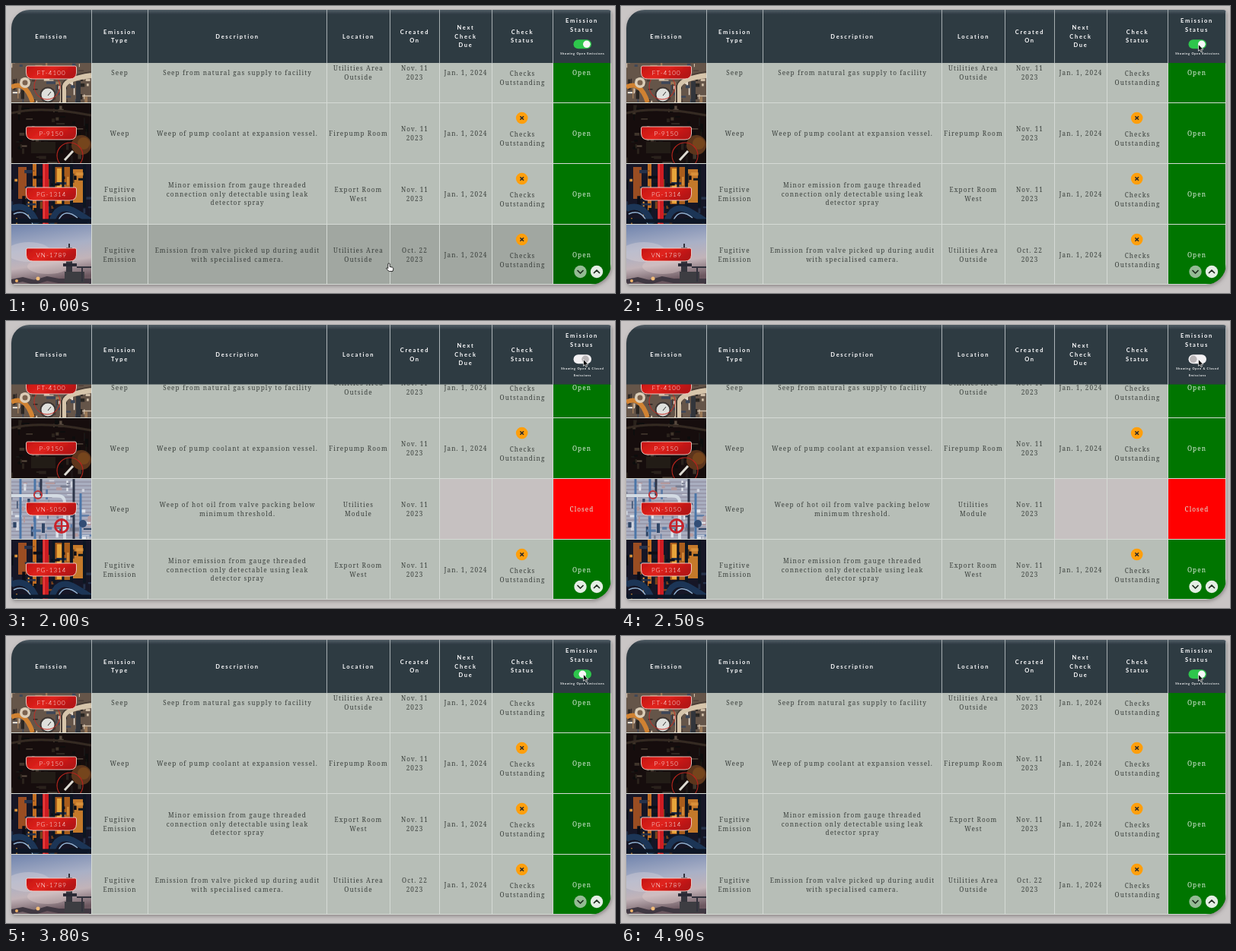
An HTML page that plays this animation: 800x378 px, repeating every 5 s.

```html
<!DOCTYPE html>
<html lang="en">
<head>
<meta charset="utf-8">
<title>Emission register</title>
<style>
  html, body { margin: 0; width: 100%; height: 100%; overflow: hidden; background: #c9c5c5; }
  svg { display: block; width: 100%; height: 100%; }
  text { text-anchor: middle; }
  .cell { font: 300 8.2px "Noto Serif", serif; letter-spacing: 1.08px; fill: #3b403d; }
  .status { fill: #dcebdc; }
  .head { font: bold 7.5px Lato, sans-serif; letter-spacing: 1.7px; fill: #fff; }
  .hint { font: bold 3.9px Lato, sans-serif; letter-spacing: .68px; fill: #fff; }
  .tag { font: 300 8px Lato, sans-serif; letter-spacing: 1.1px; fill: #fff; }
</style>
</head>
<body>
<svg viewBox="0 0 800 378">
  <defs>
    <clipPath id="frame"><path d="M7 29A24 24 0 0 1 31 5H791Q795 5 795 9V340A27 27 0 0 1 768 367H12Q7 367 7 362Z"/></clipPath>
    <clipPath id="photo"><rect width="105" height="80"/></clipPath>
    <linearGradient id="headFill" x2="0" y2="1">
      <stop stop-color="#56626a"/><stop offset=".09" stop-color="#2e3a43"/><stop offset="1" stop-color="#2e3a42"/>
    </linearGradient>
    <linearGradient id="tagFill" x2="1" y2=".4">
      <stop stop-color="#c41414"/><stop offset=".5" stop-color="#e0231c"/><stop offset="1" stop-color="#b51212"/>
    </linearGradient>
    <linearGradient id="sky" x2=".2" y2="1">
      <stop stop-color="#6f83ad"/><stop offset=".45" stop-color="#a9b0c6"/>
      <stop offset=".72" stop-color="#c2b3b8"/><stop offset="1" stop-color="#6c5860"/>
    </linearGradient>
    <filter id="shadow" x="-5%" y="-5%" width="110%" height="112%">
      <feDropShadow dx="1" dy="2" stdDeviation="2.5" flood-color="#504a4a" flood-opacity=".5"/>
    </filter>
  </defs>
  <g filter="url(#shadow)">
    <g clip-path="url(#frame)">
      <g id="openRows"></g>
      <g id="allRows"></g>
      <g id="header"></g>
    </g>
  </g>
  <g id="toggle">
    <rect id="track" x="745.5" y="44.3" width="23.5" height="12" rx="6"/>
    <circle id="knob" cy="50.3" r="4.8"/>
  </g>
  <g id="hintOpen" class="hint"><text x="757.3" y="64.3">Showing Open Emissions</text></g>
  <g id="hintAll" class="hint">
    <text x="757.3" y="64.3">Showing Open &amp; Closed</text><text x="757.3" y="72.7">Emissions</text>
  </g>
  <g fill="none" stroke="#1d2a1d" stroke-width="1.7" stroke-linecap="round" stroke-linejoin="round">
    <circle id="down" cx="754.5" cy="350" r="8.2" stroke="none"/>
    <path d="M751 348.5l3.5 3.5 3.5-3.5"/>
    <circle cx="776" cy="350" r="8.2" fill="#e4eee4" stroke="none"/>
    <path d="M772.5 351.5l3.5-3.5 3.5 3.5"/>
  </g>
  <path id="hand" fill="#fff" stroke="#111" stroke-width=".9" stroke-linejoin="round"
    d="M-1.2 .5Q0 -.8 1.2 .5V4.4L4.6 5.2Q6 5.8 5.8 7.6L5 10.4H.2L-3.6 6.8Q-3.4 5 -1.2 6.6Z"/>
  <path id="arrow" fill="#111" stroke="#fff" stroke-width=".7" d="M0 0V8.8L2 7.1 3.5 10.2 5 9.5 3.6 6.6H6.3Z"/>
</svg>
<script>
const $ = id => document.getElementById(id);
const COLUMNS = [7, 112.5, 186.5, 421.5, 504.5, 569.5, 638.5, 718.5, 794.5];
const ROW_TOP = 47, ROW_HEIGHT = 80, LOOP = 5000, STEP = 100;

const middle = column => (COLUMNS[column] + COLUMNS[column + 1]) / 2;
const rect = (x, y, w, h, fill) => `<rect x="${x}" y="${y}" width="${w}" height="${h}" fill="${fill}"/>`;
const disc = (x, y, r, fill) => `<circle cx="${x}" cy="${y}" r="${r}" fill="${fill}"/>`;
const pipe = (d, colour, width) => `<path d="${d}" fill="none" stroke="${colour}" stroke-width="${width}"/>`;
const ring = (x, y, r, colour, width = 1.5) =>
  `<circle cx="${x}" cy="${y}" r="${r}" fill="none" stroke="${colour}" stroke-width="${width}"/>`;

// Centred lines of text around y, separated by "|".
function lines(string, column, y, pitch, style) {
  const parts = string.split('|');
  return parts.map((part, i) =>
    `<text class="${style}" x="${middle(column)}" y="${y + 2.8 + (i - (parts.length - 1) / 2) * pitch}">${part}</text>`).join('');
}

// Short pipe-like strokes that give a photo its machinery texture.
function clutter(count, colours, seed, top = 0) {
  const random = () => (seed = seed * 16807 % 2147483647) / 2147483647;
  let out = '';
  for (let i = 0; i < count; i++) {
    const x = random() * 105, y = top + random() * (80 - top), length = 3 + random() * 11;
    const turn = random() < .5 ? `h${length}` : `v${length}`;
    out += pipe(`M${x.toFixed(1)} ${y.toFixed(1)}${turn}`, colours[i % colours.length], (1 + random() * 3.5).toFixed(1));
  }
  return out;
}

const PHOTOS = {
  valves: rect(0, 0, 105, 80, '#65554a')
    + clutter(75, ['#cfbda6', '#2b2524', '#9c7a58', '#e8dccd', '#3c4658', '#4c3c34'], 77, 20)
    + pipe('M0 60Q18 50 28 80', '#d08233', 6) + pipe('M68 80V60Q70 48 105 44', '#d6c5ab', 8)
    + pipe('M66 80V58Q68 45 105 40', '#4a3d35', 2)
    + pipe('M88 80V52', '#33343a', 6) + disc(18, 54, 7, '#dccdb7') + disc(18, 54, 3.5, '#7b6450')
    + disc(48, 70, 10.5, '#3b3431') + disc(48, 70, 8.5, '#dfe0dc') + pipe('M48 71l4-5', '#333', 1)
    + ring(47, 59, 17, '#c62a22', 1),
  pump: rect(0, 0, 105, 80, '#17110f')
    + clutter(60, ['#2c221d', '#0b0909', '#40342c', '#1d1816', '#5a4b40', '#0f0c0b'], 311)
    + disc(92, 56, 13, '#5d361b') + disc(95, 54, 8, '#75441f')
    + pipe('M0 14Q40 4 105 17', '#352a24', 3) + rect(26, 52, 32, 15, '#241d19')
    + pipe('M70 76l11-12', '#dedbd3', 3) + ring(77, 70, 17, '#b5221c', 1.2),
  gauge: rect(0, 0, 105, 80, '#131826')
    + rect(57, 5, 20, 49, '#a95d1c') + rect(60, 7, 6, 46, '#e8a43a') + rect(81, 8, 13, 44, '#c4792a')
    + rect(9, 5, 11, 42, '#9a4d20') + rect(28, 0, 5, 62, '#c26e23')
    + clutter(45, ['#25324c', '#0b0f18', '#7a421d', '#10141f', '#d9913a'], 58)
    + [56, 68, 79, 96].map(x => pipe(`M${x} 0V58`, '#0f1420', 3)).join('')
    + pipe('M45 0V80', '#cc1c20', 8) + pipe('M43 0V80', '#ec4944', 1.5)
    + pipe('M0 60Q22 50 34 80M52 80Q60 50 84 64T105 78', '#1c3657', 8)
    + pipe('M3 67Q20 59 28 80M62 75Q70 58 87 72', '#91afd0', 1.5) + pipe('M0 76H105', '#0b1627', 5),
  tower: rect(0, 0, 105, 80, 'url(#sky)')
    + `<g opacity=".4"><ellipse cx="23" cy="37" rx="29" ry="13" fill="#d9d3da"/><ellipse cx="48" cy="56" rx="27" ry="10" fill="#e1cdcc"/></g>`
    + pipe('M0 80V76L15 73 30 77 47 72 62 75H105V80', '#403842', 6)
    + disc(35, 72, 2.5, '#f1bc79') + disc(7, 75, 2, '#edb269')
    + rect(72, 31, 8, 45, '#35343c') + rect(68, 52, 18, 4, '#292c34') + rect(70, 63, 26, 15, '#3e3c43')
    + pipe('M76 26V34M68 34H84M86 57H105M93 57V76', '#30333c', 2),
  wall: rect(0, 0, 105, 80, '#a9aec0')
    + Array.from({ length: 16 }, (_, i) => pipe(`M0 ${i * 5}H105`, '#8a8698', 1)).join('')
    + clutter(70, ['#cfd3dd', '#5d7ba6', '#7a7f92', '#b49a9e', '#2f4566', '#dfe3ea'], 924)
    + pipe('M12 0V80M31 0V31M31 52V80M91 20V80', '#4c76a8', 3)
    + pipe('M0 23H60Q70 23 70 32V80', '#d3dbe3', 4) + pipe('M39 0V23M82 0V80', '#2d3648', 3)
    + ring(66, 63, 8.5, '#c8242b', 3) + pipe('M58 63H74M66 55V71', '#c8242b', 2)
    + ring(35, 22, 5, '#bd3439', 2) + disc(94, 60, 5, '#304d74')
};

const record = (photo, tag, type, description, place, created, closed) =>
  ({ photo, tag, type, description, place, created, closed });
const seep = record('valves', 'FT-4100', 'Seep', 'Seep from natural gas supply to facility', 'Utilities Area|Outside', 'Nov. 11|2023');
const weep = record('pump', 'P-9150', 'Weep', 'Weep of pump coolant at expansion vessel.', 'Firepump Room', 'Nov. 11|2023');
const oil = record('wall', 'VN-5050', 'Weep', 'Weep of hot oil from valve packing below|minimum threshold.', 'Utilities|Module', 'Nov. 11|2023', true);
const thread = record('gauge', 'PG-1314', 'Fugitive|Emission', 'Minor emission from gauge threaded|connection only detectable using leak|detector spray', 'Export Room|West', 'Nov. 11|2023');
const audit = record('tower', 'VN-1789', 'Fugitive|Emission', 'Emission from valve picked up during audit|with specialised camera.', 'Utilities Area|Outside', 'Oct. 22|2023');

const dividers = (top, bottom, colour) =>
  COLUMNS.slice(1).map(x => pipe(`M${x} ${top}V${bottom}`, colour, 1)).join('');

function drawRow(row, index) {
  const top = ROW_TOP + index * ROW_HEIGHT, bottom = top + ROW_HEIGHT, y = top + 40.9;
  const cell = (string, column, at = y, style = 'cell') => lines(string, column, at, 11.6, style);
  const check = row.closed ? '' : cell('Jan. 1, 2024', 5) + cell('Checks|Outstanding', 6, y + 7.4)
    + disc(677.7, y - 20.4, 7.8, '#ff9f0a') + pipe(`M675.4 ${y - 22.7}l4.6 4.6m0-4.6l-4.6 4.6`, '#2b2b2b', 1.6);
  return rect(112, top, 607, ROW_HEIGHT, '#b7beb7')
    + (row.closed ? rect(570, top, 149, ROW_HEIGHT, '#c6c1c1') : '')
    + rect(719, top, 76, ROW_HEIGHT, row.closed ? '#ff0000' : '#007400')
    + `<rect class="shade" x="112" y="${top}" width="683" height="80" opacity=".12"/>`
    + `<g transform="translate(7 ${top})" clip-path="url(#photo)">${PHOTOS[row.photo]}
       <path d="M21.5 32H83.5Q85.5 32 85.5 34V41Q85 49 77 49H28Q20 49 19.5 41V34Q19.5 32 21.5 32Z" fill="url(#tagFill)" stroke="#f4d4cd" stroke-width=".9"/></g>`
    + cell(row.tag, 0, y, 'tag') + cell(row.type, 1) + cell(row.description, 2)
    + cell(row.place, 3) + cell(row.created, 4) + check
    + cell(row.closed ? 'Closed' : 'Open', 7, y, 'cell status')
    + dividers(top, bottom, '#d5dad5')
    + pipe(`M7 ${top + .5}H795M7 ${bottom - .5}H795`.slice(0, index < 3 ? 20 : undefined).split('M7').slice(0, index < 3 ? 2 : 3).join('M7'), '#d5dad5', 1);
}

$('openRows').innerHTML = [seep, weep, thread, audit].map(drawRow).join('');
$('allRows').innerHTML = [seep, weep, oil, thread].map(drawRow).join('');
const shades = document.querySelectorAll('#openRows .shade, #allRows .shade');

const TITLES = ['Emission', 'Emission|Type', 'Description', 'Location', 'Created|On', 'Next|Check|Due', 'Check|Status'];
$('header').innerHTML = '<rect id="headBox" x="7" y="4.5" width="788" fill="url(#headFill)"/>'
  + `<g id="headLines">${dividers(5, 84, '#aeb5b9')}</g>`
  + `<g id="titles">${TITLES.map((title, i) => lines(title, i, 39.7, 11.5, 'head')).join('')}</g>`
  + lines('Emission|Status', 7, 25.2, 11.5, 'head');

// Pointer stops: time, x, y.
const PATH = [[0, 503, 339], [100, 612, 235], [200, 724, 126], [300, 724, 126], [400, 740, 67], [700, 758.5, 50.5], [LOOP, 758.5, 50.5]];
function pointerAt(time) {
  const next = PATH.findIndex(stop => stop[0] > time);
  const [t0, x0, y0] = PATH[next - 1], [t1, x1, y1] = PATH[next];
  const k = (time - t0) / (t1 - t0);
  return [x0 + (x1 - x0) * k, y0 + (y1 - y0) * k];
}

const showNode = (node, visible) => node.setAttribute('display', visible ? 'inline' : 'none');
const show = (id, visible) => showNode($(id), visible);
const set = (id, values) => Object.entries(values).forEach(([name, value]) => $(id).setAttribute(name, value));
const ease = (time, start) => {
  const k = Math.min(1, Math.max(0, (time - start) / 400));
  return k * k * (3 - 2 * k);
};
const SWITCH_OFF = 1900, SWITCH_ON = 3600;

function draw(time) {
  const all = time >= SWITCH_OFF && time < SWITCH_ON;
  const [x, y] = pointerAt(time);
  const headHeight = all ? 79 : 70.5;
  show('openRows', !all);
  show('allRows', all);
  show('hintOpen', !all);
  show('hintAll', all);
  set('headBox', { height: headHeight });
  set('headLines', { transform: `translate(0 5) scale(1 ${headHeight / 79}) translate(0 -5)` });
  set('titles', { transform: `translate(0 ${(headHeight - 70.5) / 2})` });
  set('track', { fill: all ? '#f3f1f3' : '#2ec64c' });
  set('knob', { cx: 762.8 - 11 * (ease(time, SWITCH_OFF) - ease(time, SWITCH_ON)), fill: all ? '#b9b5b7' : '#f7f7f7' });
  set('down', { fill: all ? '#e4eee4' : '#94bb94' });

  const pointing = time < 600;
  show('hand', pointing);
  show('arrow', !pointing);
  set(pointing ? 'hand' : 'arrow', { transform: `translate(${x} ${y})` });
  const hovered = y > 75 ? Math.floor((y - ROW_TOP) / ROW_HEIGHT) : -1;
  shades.forEach((shade, i) => showNode(shade, i % 4 === hovered));
}

function tick() {
  draw(Math.floor(performance.now() / STEP) * STEP % LOOP);
  requestAnimationFrame(tick);
}
tick();
</script>
</body>
</html>
```
